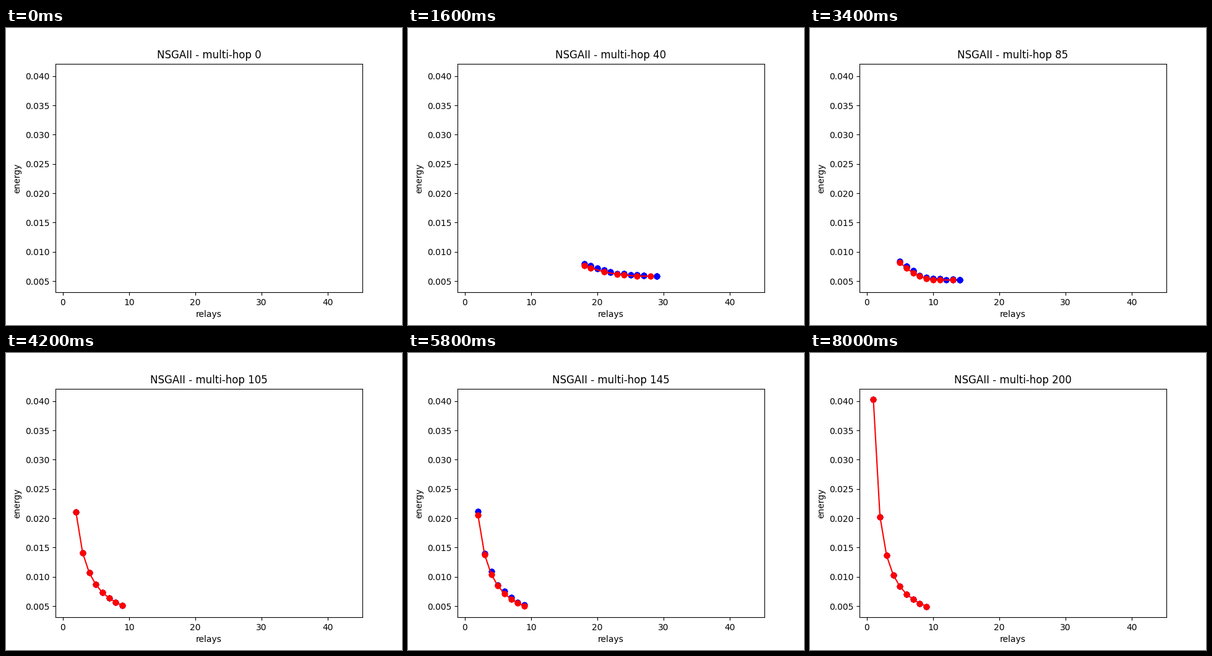
Write a matplotlib script that moves like this. It is 640 px wide and 480 px high and loops after 8200 ms.

```python
import numpy as np
import matplotlib.pyplot as plt
from matplotlib.animation import FuncAnimation

STEP = 5              # generations per picture
FRAMES = 41
SETTLED = 105         # from here on only the energies still improve
FIRST_SINGLE = 165    # generation that first needs only one relay
UNIT = 1e-4           # energies are worked out in this unit

# Key poses of the drift towards fewer relays
GENS = [5, 20, 40, 65, 100]
LEFT = [33, 27, 18, 8, 2]           # fewest relays
END = [38, 32, 28, 19, 9]           # right end of the Pareto front
RIGHT = [43, 36, 29, 21, 9]         # most relays
HIGH = [125, 83, 76.5, 76.5, 76.5]  # front energy at the left end
LOW = [95, 65, 58.3, 54.4, 50]      # front energy at the right end


def trade_off(x, gen):
    """Settled front: energy falls off as 1 / relays."""
    rest = (200 - gen) / (200 - SETTLED)
    return (401 + 15 * rest ** 2) / x + 0.4 * x + 1.3


def drifting(gen, rng):
    left, end, right, high, low = (np.interp(gen, GENS, row)
                                   for row in (LEFT, END, RIGHT, HIGH, LOW))
    left, end, right = round(left), round(end), round(right)

    def curve(x):
        u = np.clip((x - left) / (end - left), 0, 1)
        early = low + (high - low) * (1 - u) ** 2.5
        blend = np.clip((gen - 65) / 40, 0, 1)
        return np.maximum(low, (1 - blend) * early + blend * trade_off(x, gen))

    count = np.clip(round((gen - 12) / 4), 2, 8)
    xs = np.unique(np.linspace(left, end, count).astype(int))
    bx = np.append(rng.integers(left + 1, right + 1, 30), [left, right])
    spread = max(5, 90 - 2.1 * gen) * (1 - 0.8 * (bx - left) / (right - left))
    by = curve(bx) + spread * rng.uniform(0.2, 1, bx.size)
    return (bx, by), (xs, curve(xs))


def settled(gen, rng):
    xs = np.arange(1 if gen >= FIRST_SINGLE else 2, 10)
    ys = trade_off(xs, gen)
    stray = 0.06 * np.sin(np.pi * (gen - SETTLED) / (200 - SETTLED)) ** 2
    return (xs, ys * (1 + stray * rng.random(xs.size))), (xs, ys)


def population(gen):
    """Dominated points and Pareto front of one generation."""
    if gen == 0:
        return ([], []), ([], [])
    rng = np.random.default_rng(gen)
    return (drifting if gen < SETTLED else settled)(gen, rng)


fig, ax = plt.subplots(figsize=(6.4, 4.8), dpi=100)
ax.set(xlim=(-1.09, 45.2), ylim=(0.00308, 0.04212), xlabel="relays", ylabel="energy")
title = ax.set_title("")
cloud, = ax.plot([], [], "bo")
front, = ax.plot([], [], "ro-")


def update(i):
    gen = STEP * i
    title.set_text(f"NSGAII - multi-hop {gen}")
    for line, (x, y) in zip((cloud, front), population(gen)):
        # duplicates in the population give the dots crisp edges
        line.set_data(np.repeat(x, 3), np.repeat(y, 3) * UNIT)
    return cloud, front, title


anim = FuncAnimation(fig, update, frames=FRAMES, interval=200, repeat=True, repeat_delay=0)
plt.show()
```
